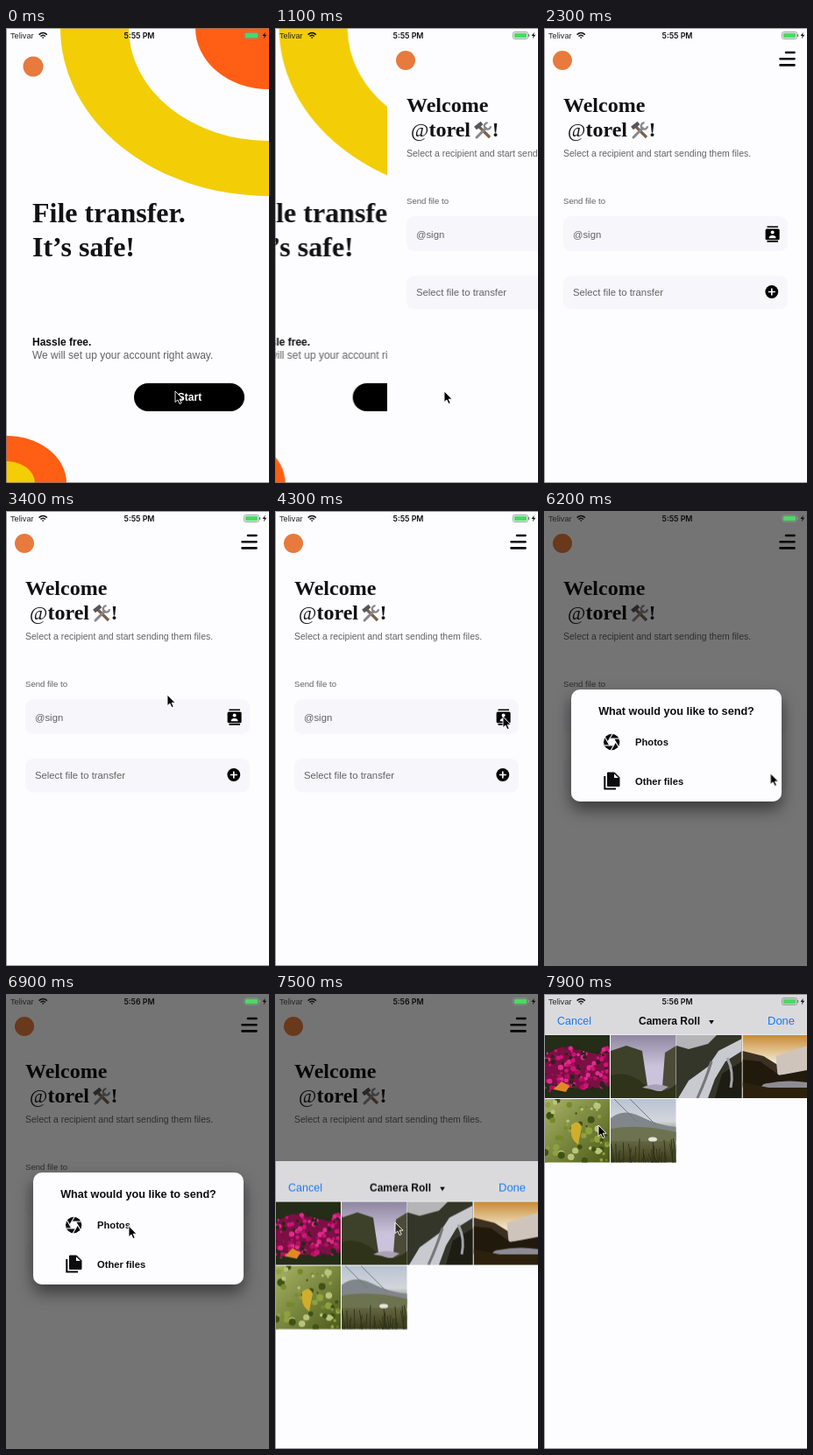
These frames come from a looping animation (300x520 px, 8 s). An HTML page:

```html
<!DOCTYPE html>
<html lang="en">
<head>
<meta charset="utf-8">
<title>File transfer</title>
<style>
  html, body { margin: 0; width: 100%; height: 100%; overflow: hidden; background: #fdfdff; }
  #stage { display: block; width: 300px; height: 520px; }
  text { font-family: "Liberation Sans", Arial, sans-serif; fill: #626264; white-space: pre; }
  .serif { font-family: "Liberation Serif", Times, serif; font-weight: bold; fill: #121214; }
  .bold { font-weight: bold; fill: #0c0c0e; }
  .mid { text-anchor: middle; }
  .time { font: 600 8.8px Inter, sans-serif; fill: #0c0c0e; }
  .blue { fill: #147af5; }
  .line { fill: none; stroke: #08080a; }
  .box { fill: #f7f7fb; }

  .a { animation: 8s linear infinite; }
  .hard { animation-timing-function: step-end; }

  #start { animation-name: leave; }
  @keyframes leave {
    0%, 11.25% { transform: none; animation-timing-function: ease-out; }
    17.5%, 100% { transform: translateX(-100px); }
  }
  #home { animation-name: enter; }
  @keyframes enter {
    0%, 11.25% { transform: translateX(300px); animation-timing-function: ease-out; }
    17.5%, 100% { transform: none; }
  }
  #empty { animation-name: empty; }
  @keyframes empty { 0% { opacity: 1; } 57.5%, 100% { opacity: 0; } }
  #filled { animation-name: filled; }
  @keyframes filled { 0% { opacity: 0; } 57.5%, 100% { opacity: 1; } }
  #file { animation-name: lift; }
  @keyframes lift { 0% { transform: none; } 57.5%, 100% { transform: translateY(-1.5px); } }

  #dim { animation-name: dim; }
  @keyframes dim { 0%, 73.75% { opacity: 0; } 76.25%, 100% { opacity: 1; } }
  #dialog { animation-name: dialog; }
  @keyframes dialog {
    0%, 73.75% { opacity: 0; }
    76.25%, 91.25% { opacity: 1; }
    92.5%, 100% { opacity: 0; }
  }
  #sheet { animation-name: rise; }
  @keyframes rise {
    0%, 91.19% { transform: translateY(520px); animation-timing-function: ease; }
    98.19%, 100% { transform: none; }
  }

  #before { animation-name: before; }
  @keyframes before { 0% { opacity: 1; } 81.25%, 100% { opacity: 0; } }
  #after { animation-name: after; }
  @keyframes after { 0% { opacity: 0; } 81.25%, 100% { opacity: 1; } }

  #cursor { animation-name: move; animation-timing-function: ease-in-out; }
  @keyframes move {
    0%, 20% { transform: translate(193px, 415px); }
    35% { transform: translate(192px, 250px); }
    42.5% { transform: translate(184px, 210px); }
    50%, 57% { transform: translate(260px, 235px); }
    65% { transform: translate(170px, 275px); }
    72%, 77% { transform: translate(259px, 300px); }
    86.25%, 90% { transform: translate(140px, 265px); }
    93.75% { transform: translate(137px, 261px); }
    98.75%, 100% { transform: translate(62px, 150px); }
  }
  #arrow { fill: #000; stroke: #fff; animation-name: arrow; }
  @keyframes arrow {
    0% { opacity: 1; }
    15% { opacity: 0; }
    37.5% { opacity: 1; fill-opacity: 1; }
    91.25% { fill-opacity: .35; }
    96.25%, 100% { opacity: 1; fill-opacity: 1; }
  }
</style>
</head>
<body>
<svg id="stage" viewBox="0 0 300 520" xmlns="http://www.w3.org/2000/svg">
  <defs>
    <filter id="shadow" x="-20%" y="-20%" width="140%" height="160%">
      <feDropShadow dx="0" dy="9" stdDeviation="9" flood-color="#000" flood-opacity=".5"/>
    </filter>
    <linearGradient id="mist" x2="0" y2="1">
      <stop offset="0" stop-color="#8f87a0"/><stop offset=".5" stop-color="#cbc3dc"/>
    </linearGradient>
    <linearGradient id="dusk" x2="0" y2="1">
      <stop offset="0" stop-color="#c98a35"/><stop offset=".4" stop-color="#f0e2c4"/>
    </linearGradient>
    <linearGradient id="leaf" x2="1" y2="1">
      <stop offset="0" stop-color="#a9b365"/><stop offset="1" stop-color="#4a5a18"/>
    </linearGradient>
    <linearGradient id="field" x2="0" y2="1">
      <stop offset="0" stop-color="#b9c3d2"/><stop offset=".35" stop-color="#d3d6dc"/>
      <stop offset=".6" stop-color="#6a6f48"/><stop offset="1" stop-color="#3c3c1a"/>
    </linearGradient>
    <g id="tools" fill="none" stroke-width="3">
      <path d="M7 7 19 19" stroke="#7d6049" stroke-width="3.2"/>
      <path d="M2.5 8.5 10 2.5" stroke="#55555a" stroke-width="4.6"/>
      <path d="M4 19 14.5 8.5" stroke="#88888c" stroke-linecap="round"/>
      <path d="M16.6 2.4A3.6 3.6 0 1 0 20 6.2" stroke="#88888c" stroke-width="2.4"/>
    </g>
    <path id="blade" d="M-2.2-3.9H8.4"/>
  </defs>

  <rect width="300" height="520" fill="#fdfdff"/>

  <g id="start" class="a">
    <g fill="#f3cd05">
      <ellipse cx="300" cy="0" rx="238" ry="192"/>
      <ellipse cx="300" cy="0" rx="160" ry="129" fill="#fdfdff"/>
      <ellipse cx="300" cy="0" rx="84" ry="70" fill="#ff5e14"/>
      <ellipse cx="0" cy="520" rx="69" ry="54" fill="#ff5e14"/>
      <ellipse cx="0" cy="520" rx="33" ry="25"/>
    </g>
    <circle cx="31" cy="44" r="11.5" fill="#e77a3c"/>
    <g font-size="32">
      <text class="serif" x="30" y="222">File transfer.</text>
      <text class="serif" x="30" y="261">It’s safe!</text>
    </g>
    <text class="bold" x="30" y="363" font-size="12">Hassle free.</text>
    <text x="30" y="377.5" font-size="12">We will set up your account right away.</text>
    <rect x="146" y="406" width="126" height="32" rx="16"/>
    <text class="mid" x="209.5" y="426" font-size="12" font-weight="bold" style="fill:#fff">Start</text>
  </g>

  <g id="home" class="a">
    <rect width="300" height="520" fill="#fdfdff"/>
    <circle cx="21" cy="37" r="11" fill="#e77a3c"/>
    <path class="line" d="M276 28H285.5M269.5 35.2H285.5M269.5 42.4H285.5" stroke-width="2.6" stroke-linecap="round"/>
    <g font-size="24">
      <text class="serif" x="22" y="96">Welcome</text>
      <text class="serif" x="27" y="124" font-size="22" style="font-weight:normal">@</text>
      <text class="serif" x="47.5" y="124">torel</text>
      <use href="#tools" x="98" y="106"/>
      <text class="serif" x="119.5" y="124">!</text>
    </g>
    <text x="22" y="147" font-size="10.47">Select a recipient and start sending them files.</text>
    <text x="22" y="201" font-size="9.6">Send file to</text>

    <rect class="box" x="22" y="215" width="256" height="40" rx="9"/>
    <g id="empty" class="a hard">
      <text x="33" y="240" font-size="11.3">@sign</text>
      <path d="M254.5 227.3H267M254.5 243.9H267" stroke="#000" stroke-width="1.6"/>
      <rect x="252.6" y="229.5" width="16" height="12.8" rx="1.5"/>
      <circle cx="260.6" cy="233.6" r="2" fill="#fff"/>
      <path d="M256.6 240.3Q256.8 237 260.6 237T264.6 240.3Z" fill="#fff"/>
    </g>
    <g id="filled" class="a hard">
      <ellipse cx="49.5" cy="235" rx="16.8" ry="16" fill="#efe6e4"/>
      <text class="mid" x="49.5" y="241" font-size="20" style="fill:#8a8284">@</text>
      <text x="77" y="239.5" font-size="11">@pelun</text>
      <use href="#tools" transform="translate(115 230) scale(.53)"/>
      <path class="line" d="M255.5 231 264 239.5M264 231 255.5 239.5" stroke-width="1.9"/>
    </g>

    <g id="file" class="a hard">
      <rect class="box" x="22" y="283" width="256" height="38.5" rx="9"/>
      <text x="33" y="306" font-size="11.3">Select file to transfer</text>
      <circle cx="259.8" cy="301.5" r="7.4"/>
      <path d="M255.8 301.5H263.8M259.8 297.5V305.5" stroke="#fff" stroke-width="1.6"/>
    </g>
  </g>

  <rect id="dim" class="a" width="300" height="520" fill-opacity=".54"/>

  <g id="dialog" class="a">
    <rect x="31" y="204" width="240" height="128" rx="10" fill="#fdfdff" filter="url(#shadow)"/>
    <text class="bold mid" x="151" y="233" font-size="12.65">What would you like to send?</text>
    <text class="bold" x="104" y="268" font-size="11.2">Photos</text>
    <text class="bold" x="104" y="312.5" font-size="11.15">Other files</text>
    <g transform="translate(77.2 264)">
      <circle r="9.2" fill="#0c0c0e"/>
      <circle r="3.9" fill="#fdfdff"/>
      <g id="blades" stroke="#fdfdff" stroke-width="1.1"></g>
    </g>
    <path class="line" d="M69.3 303V317.6H82" stroke-width="2"/>
    <path d="M72.5 299H80.5L86 304.5V314.5H72.5Z" fill="#0c0c0e" stroke="#0c0c0e" stroke-linejoin="round"/>
    <path d="M80 300.2V305H84.8Z" fill="#fdfdff"/>
  </g>

  <g id="sheet" class="a">
    <rect width="300" height="520" fill="#fdfdff"/>
    <rect width="300" height="46.5" fill="#dadadd"/>
    <text class="blue" x="15" y="35.5" font-size="12.5">Cancel</text>
    <text class="bold" x="108" y="35.5" font-size="12">Camera Roll</text>
    <path d="M188.2 30H193.8L191 34.6Z"/>
    <text class="blue" x="255" y="35.5" font-size="13">Done</text>

    <svg x="1" y="47" width="74" height="72">
      <rect width="74" height="72" fill="#232d17"/>
      <path d="M0 24Q18 8 38 16T74 20V58Q40 66 0 54Z" fill="#7c0f45"/>
      <g id="blooms"></g>
      <path d="M10 62 19 53 28 58 24 65Z" fill="#e08a24"/>
    </svg>
    <svg x="76" y="47" width="74.5" height="72">
      <rect width="75" height="72" fill="url(#mist)"/>
      <path d="M0 18 18 12 36 18 42 58 0 72Z" fill="#3d4129"/>
      <path d="M75 12 62 20 58 72H75Z" fill="#4c4b38"/>
      <path d="M0 46Q20 40 38 56T75 56V72H0Z" fill="#2e3319"/>
      <path d="M36 60Q50 53 66 59L58 64Z" fill="#a9a1b4"/>
    </svg>
    <svg x="151" y="47" width="74.5" height="72">
      <rect width="75" height="72" fill="#34362a"/>
      <path d="M0 0H46L36 10 14 16 0 12Z" fill="#b5b5b8"/>
      <path d="M75 4 48 18 36 36 14 52 2 72H36L44 50 56 30 75 18Z" fill="#c9c9d0"/>
      <path d="M40 30Q34 50 24 72" fill="none" stroke="#77777a" stroke-width="3"/>
      <path d="M52 44 75 30V72H44Z" fill="#1d1d14"/>
      <path d="M58 26Q66 42 62 60" fill="none" stroke="#a3a3aa" stroke-width="3"/>
    </svg>
    <svg x="226.5" y="47" width="73.5" height="72">
      <rect width="74" height="72" fill="url(#dusk)"/>
      <path d="M0 18 24 24 40 34 74 16V58H0Z" fill="#3c3020"/>
      <path d="M38 24 74 12V42L40 46Z" fill="#cfc4bc"/>
      <path d="M0 28 20 30 42 46 74 40V60H0Z" fill="#211a0c"/>
      <path d="M24 56Q48 50 74 54V62H18Z" fill="#8d8c94"/>
      <path d="M0 54 30 60 74 60V72H0Z" fill="#2c210c"/>
    </svg>
    <svg x="1" y="120" width="74" height="72.5">
      <rect width="74" height="73" fill="url(#leaf)"/>
      <g id="leaves"></g>
      <path d="M30 30Q38 22 42 32L38 52Q28 46 30 30Z" fill="#cfae2c"/>
    </svg>
    <svg x="76" y="120" width="74.5" height="72.5">
      <rect width="75" height="73" fill="url(#field)"/>
      <path d="M0 22Q14 10 34 20T75 32V44H0Z" fill="#80868a"/>
      <path d="M0 34Q34 28 75 38V48H0Z" fill="#6d7350"/>
      <path d="M4 0 30 26M22 0 52 30" stroke="#767880" fill="none"/>
      <g id="grass" stroke="#30341a"></g>
      <ellipse cx="48" cy="46" rx="5" ry="2.6" fill="#e6e4dc"/>
    </svg>
  </g>

  <g id="status">
    <text x="5" y="11.8" font-size="9.2" style="fill:#242426">Telivar</text>
    <g fill="none" stroke="#0c0c0e" stroke-width="1.6">
      <path d="M37.6 7.6Q42.2 3.4 46.8 7.6M39.5 9.5Q42.2 7 44.9 9.5"/>
      <path d="M40.9 10.6H43.5L42.2 12.2Z" fill="#0c0c0e" stroke="none"/>
    </g>
    <text id="before" class="time mid a hard" x="152" y="12">5:55 PM</text>
    <text id="after" class="time mid a hard" x="152" y="12">5:56 PM</text>
    <rect x="271.5" y="4.5" width="17" height="8" rx="2" fill="none" stroke="#8a8a8e" stroke-width=".8"/>
    <rect x="272.8" y="5.8" width="14.4" height="5.4" rx="1" fill="#4cd964"/>
    <path d="M289.6 7V10" stroke="#8a8a8e" stroke-width="1.2"/>
    <path d="M295.8 4.8 292.6 9H294.8L293.8 12.4 297.2 7.8H295Z" fill="#0c0c0e"/>
  </g>

  <path d="M.5 520V.5H300M0 519.5H300" fill="none" stroke="#77777a" stroke-opacity=".7"/>

  <g id="cursor" class="a">
    <path id="arrow" class="a hard" stroke-width=".9" d="M0 0V12.6L2.9 10 5 14.6 7.2 13.6 5.1 9.2H9Z"/>
  </g>
</svg>
<script>
  let seed = 7;
  const rand = (a, b) => {
    seed = seed * 16807 % 2147483647;
    return a + (b - a) * seed / 2147483647;
  };
  const fill = (id, count, shape) => {
    document.getElementById(id).innerHTML = Array.from({ length: count }, (_, i) => shape(i)).join('');
  };
  const blob = (colors, y0, y1, r) => i =>
    `<circle cx="${rand(0, 74)}" cy="${rand(y0, y1)}" r="${rand(1, r)}" fill="${colors[i % colors.length]}"/>`;

  fill('blades', 6, i => `<use href="#blade" transform="rotate(${i * 60})"/>`);
  fill('blooms', 120, blob(['#d01478', '#b00f60', '#e02c8c', '#2a2618'], 14, 64, 3.2));
  fill('leaves', 60, blob(['#b9c47c', '#748a2a', '#3f5214', '#8fa040'], 0, 73, 4.5));
  fill('grass', 40, () => {
    const x = rand(0, 75), y = rand(44, 68);
    return `<path d="M${x} 73L${x + rand(-4, 4)} ${y}"/>`;
  });
</script>
</body>
</html>
```
